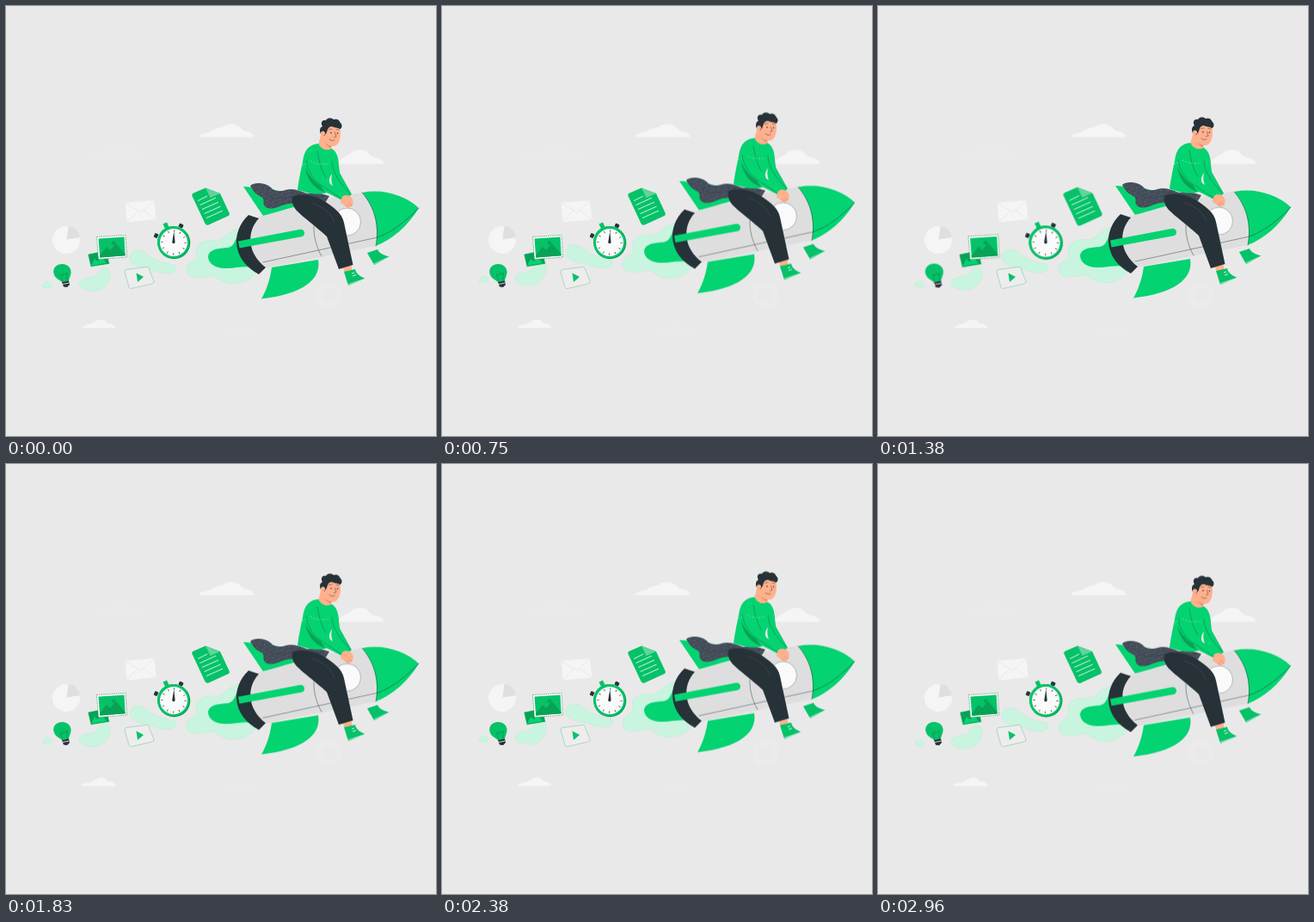
Recreate the animation shown at these times as an HTML page. Size 500x500 px, loop 3000 ms.

```html
<!DOCTYPE html>
<html lang="en">
<head>
<meta charset="utf-8">
<title>Rocket ride</title>
<style>
  :root { --green: #04d371; --deep: #05c268; --shade: #07a256; --mint: #c9f4df; --ink: #263238; --skin: #ffb08d; --pale: #f5f5f5; }
  html, body { margin: 0; width: 100%; height: 100%; overflow: hidden; background: #e9e9e9; }
  svg { display: block; width: 100vw; height: 100vh; }
  .float { animation: float 1.5s linear infinite; }
  .pulse { transform-box: fill-box; transform-origin: center; animation: pulse .75s ease-in-out -.58s infinite; }
  @keyframes float { 50% { transform: translateY(-6.5px); } }
  @keyframes pulse { 0%, 22%, 78%, 100% { transform: scale(1); } 50% { transform: scale(1.055); } }
  .green { fill: var(--green); }
  .deep { fill: var(--deep); }
  .shade { fill: var(--shade); }
  .ink { fill: var(--ink); }
  .skin { fill: var(--skin); }
  .pale { fill: var(--pale); }
  .faint { fill: #eaeaea; }
  .trace { fill: none; stroke: #ebebeb; }
  .mint { fill: var(--mint); stroke: #a5e9c8; stroke-width: .5; stroke-dasharray: 1.2 1; }
  .line { fill: none; stroke: var(--ink); stroke-width: .45; stroke-linecap: round; }
  .white { fill: none; stroke: #fff; stroke-width: .8; }
</style>
</head>
<body>
<svg viewBox="0 0 500 500">
  <defs>
    <pattern id="specks" width="7" height="6" patternUnits="userSpaceOnUse" patternTransform="rotate(18)">
      <rect width="7" height="6" fill="#434c58"/>
      <path d="M1 1.5h1.1M4.6 3l.8.5M2.4 5h.8" stroke="#8e97a1" stroke-width=".6"/>
    </pattern>
  </defs>

  <!-- sky -->
  <path class="pale" d="M224 152.5C227 147 234 148 238 146C243 141 249 143 253 140C260 135 270 137 274 143C277 147 286 144 288.500 152.500Z"/>
  <path class="pale" d="M387 183.500C388 175 397 176 401 171C408 166 418 166 422 172C426 178 438 175 440 183.500Z"/>
  <path class="pale" d="M88 374.500C90 370 97 371 102 368C108 364 114 363 117 368C121 370 126 369 127.500 374.500Z"/>
  <path class="faint" d="M80 181C86 174 98 175 106 170C112 164 118 166 123 160C132 153 143 158 146 165C154 169 166 170 168 181Z"/>
  <path class="faint" d="M238 384C246 378 254 379 260 374C268 367 278 368 281 374C288 377 296 376 299 384Z"/>
  <circle class="trace" cx="376" cy="336" r="12" stroke-width="7"/>
  <path class="trace" d="M187 342a19 19 0 1 0 38 0a19 19 0 1 0-38 0h38M206 323v38M206 323q-18 19 0 38q18-19 0-38"/>

  <!-- pie chart -->
  <circle class="pale" cx="70" cy="272" r="16"/>
  <path d="M70.500 271.500L72.500 256C80 256.500 85 262 86 269Z" fill="#dfdfdf"/>

  <!-- envelope -->
  <path class="pale" d="M138.500 229L172 226L174.500 248L140.500 251.500Z"/>
  <path d="M139 229.500L157 240L172 226.500M141 251L153 238M174 248L160 237.500" fill="none" stroke="#e2e2e2" stroke-width=".7"/>

  <!-- smoke -->
  <g class="float">
    <path class="mint" d="M43 327C42 322 48 320 51 322C55 324 54 328 50 328.500Z"/>
    <path class="mint" d="M110 306C117 302 123 307 121 315C118 327 109 333 97 331C84 329 82 321 89 318C97 315 104 316 106 311Z"/>
    <path class="mint" d="M144 292C145 283 156 282 164 288C172 296 184 299 195 301C201 305 198 310 189 311C179 312 173 307 165 306C152 304 144 300 144 292Z"/>
    <path class="mint" d="M273 258C257 261 254 272 244 273C231 271 218 277 222 289C224 298 209 296 210 308C211 318 224 317 236 314C246 313 249 322 262 323C276 323 284 318 290 311Z"/>
  </g>

  <!-- video card -->
  <path d="M140 306.500L163 303.500Q165 303 166 305L172 320Q172.500 322 170 323L146 328.500Q144 329 143 327L138 309Q138 307 140 306.500Z" fill="#ededed" stroke="#8fcfae" stroke-width=".7"/>
  <path class="deep" d="M151.500 310.500L160 315L153 321Z"/>

  <!-- light bulb -->
  <g class="pulse">
    <path class="deep" d="M55.500 311C54 305 59 300 65 300C72 300 76 305 75.500 310C75 315 73 317 73 320L65 321C62 318 57 317 55.500 311Z"/>
    <path d="M66 320L63 312L66 314L67 310.500L69.500 313L71 310L71 319" fill="none" stroke="#078c4b" stroke-width=".6"/>
    <path class="ink" d="M65 321L73 319.500L74 324L71 327L67 326.500Z"/>
    <path d="M66 323.500L73.500 322" class="white"/>
  </g>

  <!-- pictures -->
  <g class="pulse">
    <path class="shade" d="M95 288.500L117 284L120.500 300L98.500 303.500Z" stroke="#e9f5ee" stroke-width=".6"/>
    <path class="green" d="M99 302L103 294L107 297L111 291L117 299Z"/>
    <path d="M105.500 268.500L139 266.500L140.500 292L107.500 294.500Z" fill="#fff" stroke="#5a9278" stroke-width=".8" stroke-dasharray="1.5 1"/>
    <path class="deep" d="M107.500 270.500L137.500 268.500L138.700 290.300L109.200 292.500Z"/>
    <path class="shade" d="M109 290L117 280L121 284L128 276L138.500 288.500L138.700 290.300L109.200 292.500Z"/>
    <circle class="shade" cx="125" cy="275.500" r="2.300"/>
  </g>

  <!-- stopwatch -->
  <g class="pulse">
    <path class="deep" d="M182.500 253.500L187 251.500L190 258L185.500 260Z"/>
    <rect class="ink" x="-2.500" y="-2.200" width="5" height="4.400" rx="1" transform="translate(174.500 267) rotate(-65)"/>
    <rect class="ink" x="-2.500" y="-2.200" width="5" height="4.400" rx="1" transform="translate(203.500 255.500) rotate(25)"/>
    <circle class="shade" cx="195.300" cy="275.300" r="19"/>
    <circle class="deep" cx="194.500" cy="274.500" r="18.600"/>
    <circle cx="195" cy="275" r="16" fill="#fafafa"/>
    <circle cx="195" cy="275" r="13.500" fill="none" stroke="#263238" stroke-width="2.400" stroke-dasharray=".7 6.369"/>
    <path class="ink" d="M195.300 262L196.500 274A1.700 1.700 0 1 1 193.300 274Z"/>
  </g>

  <!-- document -->
  <g class="pulse">
    <path class="deep" d="M218 217.500L232 211.500L249 218L259.500 240.500Q260.500 243 258.500 244L235.500 254.500Q233 255.500 231.500 253L216.500 221Q215.500 218.500 218 217.500Z"/>
    <path d="M232 211.500L249 218L237.500 223Z" fill="#62d39b"/>
    <path class="white" d="M223 226.500L234 221M225.500 231.500L244 223M228 236.500L247 228M230.500 241.500L249.500 233M233 246.500L252 238"/>
  </g>

  <!-- rocket and rider -->
  <g class="float">
    <path class="green" d="M274 261C266 267 268 279 258 281C248 282 237 282 235 291C235 300 245 306 257 305C268 305 275 302 288 304Z"/>
    <path class="green" d="M276 210C300 212 325 212 347 228L340 236L299 244Z"/>
    <path class="green" d="M309 304L363 295C367 318 345 335 297 340.500C303 330 307 318 309 304Z"/>
    <path class="deep" d="M420 287L432 283C434 288 440 290 446 291.500L428 301Z"/>
    <path d="M427.500 300L446 291.500" stroke="#fff" stroke-width=".6"/>

    <path d="M291 246C325 237 370 222 414 217C428 233 435 255 430 279L303 304.500C281 289 279 263 291 246Z" fill="#dedede"/>
    <path class="green" d="M414 217C440 212 465 221 480 235C466 257 450 271 430 279C434 254 428 233 414 217Z"/>
    <path class="line" d="M299 298L432 269C451 262 466 249 480 235M373 225C353 242 355 270 367 291M414 217C428 233 435 255 430 279"/>
    <path class="ink" d="M282 243L294 247C279 263 281 288 302 304L294 312C264 296 260 264 282 243Z"/>
    <path class="green" d="M270 273.500L342 259.800A4.300 4.300 0 0 1 343.500 268.300L271.500 281.500Z"/>
    <circle cx="396.500" cy="251" r="16" fill="#fafafa" stroke="#8c9296" stroke-width=".6"/>

    <path d="M284 209C290 204 302 206 308 211C312 216 318 216 325 214C334 211 342 215 350 218C360 216 367 218 376 221L371 229L337 231C324 226 316 238 304 235C295 230 304 225 295 221C289 218 287 214 284 209Z" fill="url(#specks)"/>
    <path d="M303 219C313 230 325 218 338 224M330 217C342 220 355 222 370 222" class="line" opacity=".6"/>

    <path class="skin" d="M391 302L401 299L403 309L394 311Z"/>
    <path class="deep" d="M393 309L406 306C407 312 413 315 418 317L398 325Z"/>
    <path d="M397.500 324L418 317" stroke="#fff" stroke-width=".7"/>
    <path d="M402 311L405 310M403 314L407 312.500" class="white"/>
    <path class="ink" d="M334 221C345 217 361 221 370 227C380 233 391 241 393 252L403.500 301L387 306L373 268C360 256 346 246 338 238C333 232 331 225 334 221Z"/>
    <path d="M356 229C370 234 378 241 382 252" fill="none" stroke="#526069" stroke-width=".4"/>

    <path class="deep" d="M376 167C385 170 387 182 388 194L402 219L395 224L378 207Z"/>
    <path class="green" d="M364 160C353 161 347 166 345 181C342 195 340 205 339 214C350 217 362 221 373 217L391 226L401 219L387 194C387 181 387 171 379 166Z"/>
    <path class="shade" d="M348 188C350 201 357 212 371 217L366 209C358 204 352 197 348 188Z"/>
    <path d="M379 195C376 199 375 203 377 207L380 209C378 204 378 200 379 195Z" fill="#e9e9e9"/>
    <path class="line" d="M349 180C351 194 359 204 369 210L390 224M379 181C379 193 389 207 400 218M362 169C364 180 366 190 372 199" opacity=".7"/>
    <path class="white" d="M344 185L350 183M354 180Q363 186 376 183" stroke-dasharray="2 1.700" opacity=".45"/>
    <path class="skin" d="M390 224C391 219 398 219 402 223C405 227 404 233 400 234C396 236 394 231 389 229Z"/>
    <path d="M395 231L399 234M398 229L402 232" stroke="#d87960" stroke-width=".5"/>

    <path class="skin" d="M367 146L363.500 160C366 167 374 169 378 166L378.500 163C386 164 388.500 157 389 149L388.500 139L373 137Z"/>
    <path d="M371 159Q374 162.500 378.500 163L378 165Q373 163 371 159Z" fill="#e98567"/>
    <path class="ink" d="M366 149C364 145 365 141 368 140C365 136 368 132 372 133C374 129 379 130 381 132C386 130 388 134 389 136C392 139 390 143 388 143C386 141 382 142 379 140C375 140 374 143 373 147L370 151C368 148 367 147 366 149Z"/>
    <circle class="skin" cx="368.500" cy="148" r="2.500"/>
    <path class="line" d="M375.500 143.500L379 143M384 143.500L387 144M382.500 147L384 152L381.500 152.500M376 155Q379 158 382 156" stroke-width=".8"/>
    <circle class="ink" cx="378" cy="147.500" r=".8"/>
    <circle class="ink" cx="385.500" cy="148" r=".8"/>
  </g>
</svg>
</body>
</html>
```
